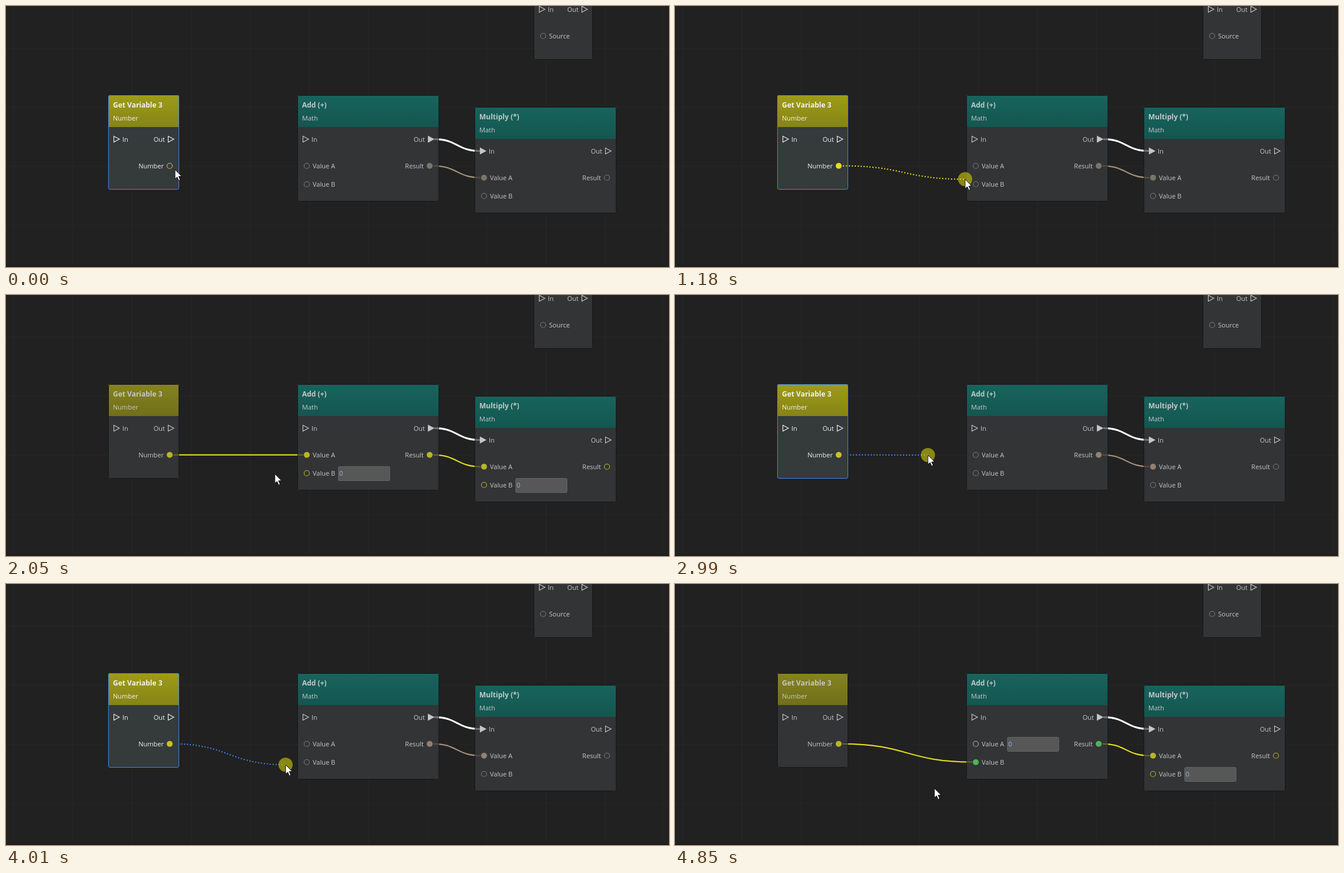
These frames come from a looping animation (1122 by 442 pixels, 5.18 s). An HTML page with a canvas:

```html
<!DOCTYPE html>
<html>
<head>
<meta charset="utf-8">
<style>
html, body { margin: 0; width: 1122px; height: 442px; overflow: hidden; background: #212121; }
canvas { display: block; }
</style>
</head>
<body>
<canvas id="stage" width="1122" height="442"></canvas>
<script>
const g = document.getElementById('stage').getContext('2d');
const LOOP = 5180, YELLOW = '#e2de1e', DULL = '#b8b528', BROWN = '#a59678', BLUE = '#4180ee', GREEN = '#50b258';

// Pointer path: time, x, y
const path = [
  [30, 286, 277], [260, 276, 267], [440, 275, 266], [620, 276, 266], [770, 363, 295],
  [900, 418, 299], [1130, 480, 297], [1200, 495, 292], [1540, 500, 277], [1740, 500, 276],
  [2050, 455, 303], [2380, 455, 303], [2890, 428, 271], [2990, 428, 271], [3520, 430, 269],
  [3650, 435, 269], [4010, 473, 306], [4060, 480, 307], [4180, 497, 304], [4340, 502, 302],
  [4620, 503, 302], [4850, 439, 346]
];

function pointerAt(t) {
  const i = path.findIndex(p => p[0] > t);
  if (i < 0) return path[path.length - 1].slice(1);
  if (i === 0) return path[0].slice(1);
  const [t0, x0, y0] = path[i - 1], [t1, x1, y1] = path[i];
  const k = (t - t0) / (t1 - t0);
  return [x0 + (x1 - x0) * k, y0 + (y1 - y0) * k];
}

function text(s, x, y, color, align = 'left', weight = '400 11px') {
  g.font = weight + ' "Open Sans", sans-serif';
  g.textAlign = align;
  g.fillStyle = color;
  g.fillText(s, x, y + 4);
}

function dot(x, y, color, full) {
  g.beginPath();
  g.arc(x, y, full ? 5 : 4.5, 0, 7);
  g.fillStyle = g.strokeStyle = color;
  g.lineWidth = 1.1;
  full ? g.fill() : g.stroke();
}

function arrow(x, y, color, full) {
  g.beginPath();
  g.moveTo(x, y - 5);
  g.lineTo(x + 9.5, y);
  g.lineTo(x, y + 5);
  g.closePath();
  g.fillStyle = g.strokeStyle = color;
  g.lineWidth = 1.1;
  if (full) g.fill();
  g.stroke();
}

function field(x, y) {
  g.beginPath();
  g.roundRect(x + .5, y - 11.5, 87, 24, 2);
  g.fillStyle = '#575757';
  g.fill();
  g.strokeStyle = '#636363';
  g.lineWidth = 1;
  g.stroke();
  text('0', x + 2, y, '#8fbbe2');
}

function box(x, y, w, h, hover, head) {
  g.save();
  g.beginPath();
  g.roundRect(x, y, w, h, 3);
  g.clip();
  g.fillStyle = hover ? '#353a3b' : '#333436';
  g.fillRect(x, y, w, h);
  if (head) {
    const fill = g.createLinearGradient(0, y, 0, y + 54);
    fill.addColorStop(0, head[0]);
    fill.addColorStop(1, head[1]);
    g.fillStyle = fill;
    g.fillRect(x, y, w, 54);
  }
  g.restore();
  g.beginPath();
  g.roundRect(x + .5, y + .5, w - 1, h - 1, 3);
  g.strokeStyle = hover ? '#4484ec' : '#171717';
  g.lineWidth = 1;
  g.stroke();
}

// flow: [in connected, out connected]; ports: [label, dy, isOutput, color, full, hasField]
function node(x, y, w, h, title, kind, hover, head, flow, ports) {
  const ink = hover ? '#f2f2f2' : '#c6c6c6';
  box(x, y, w, h, hover, head);
  if (title) {
    text(title, x + 8, y + 17, ink, 'left', '700 12px');
    text(kind, x + 8, y + 39, ink);
  }
  arrow(x + 9.5, y + 74.5, ink, flow[0]);
  text('In', x + 24, y + 75, ink);
  arrow(x + w - 18.5, y + 74.5, ink, flow[1]);
  text('Out', x + w - 24, y + 75, ink, 'right');
  for (const [label, dy, isOut, color, full, hasField] of ports) {
    const px = isOut ? x + w - 16 : x + 16;
    dot(px, y + dy - .3, color, full);
    text(label, isOut ? px - 10 : px + 10, y + dy, ink, isOut ? 'right' : 'left');
    if (hasField) field(x + 69, y + dy);
  }
}

function wire(x0, y0, x1, y1, color, width, dash = []) {
  const mid = (x0 + x1) / 2;
  g.beginPath();
  g.moveTo(x0, y0);
  g.bezierCurveTo(mid, y0, mid, y1, x1, y1);
  g.strokeStyle = color;
  g.lineWidth = width;
  g.setLineDash(dash);
  g.stroke();
  g.setLineDash([]);
}

function pointer(x, y) {
  g.beginPath();
  [[0, 0], [0, 16], [3.7, 12.7], [6.3, 18.7], [8.9, 17.5], [6.3, 11.7], [11.2, 11.5]]
    .forEach(([dx, dy]) => g.lineTo(x + dx, y + dy));
  g.closePath();
  g.fillStyle = '#fff';
  g.strokeStyle = '#111';
  g.lineWidth = 1;
  g.fill();
  g.stroke();
}

function grid() {
  g.fillStyle = '#212121';
  g.fillRect(0, 0, 1122, 442);
  g.fillStyle = '#272727';
  for (let x = 13; x < 1122; x += 100) g.fillRect(x, 0, 1, 442);
  for (let y = 71; y < 442; y += 100) g.fillRect(0, y, 1122, 1);
  g.fillStyle = '#1b1b1b';
  g.fillRect(0, 440, 1122, 2);
}

function draw(t) {
  const [mx, my] = pointerAt(t);
  const firstDrag = t >= 620 && t < 1740, secondDrag = t >= 2990 && t < 4620;
  const drag = firstDrag || secondDrag;
  const toA = t >= 1740 && t < 2990, toB = t >= 4620, linked = toA || toB;
  const overAdd = mx > 493, overVar = t < 1740 || secondDrag;
  const snap = drag && overAdd, snapB = snap && my > 286, snapA = snap && !snapB;
  const wireHot = t >= 2700 && t < 2990;

  const idle = '#797972', warm = overAdd ? '#aaa597' : idle;
  const joined = overAdd ? '#a8927c' : secondDrag ? '#957f6e' : '#7b746a';
  const result = toB ? GREEN : toA ? DULL : joined;
  const portA = toA ? DULL : toB ? '#b5ad98' : snapA ? '#a8927c' : warm;
  const portB = toB ? GREEN : toA ? DULL : snapB ? '#d0c83a' : warm;
  const mulA = linked ? DULL : secondDrag ? '#957f6e' : '#7b746a';
  const number = firstDrag ? YELLOW : secondDrag ? '#c8c324' : linked ? DULL : '#cbc821';

  const links = () => {
    wire(725, 225.5, 802, 245.5, '#fff', 3);
    wire(723, 270.7, 803, 290.7, linked ? YELLOW : secondDrag ? '#a89078' : BROWN, 2);
    if (toA) wire(283, 270.7, 503, 270.7, wireHot ? BLUE : YELLOW, wireHot ? 3 : 2);
    if (toB) wire(283, 270.7, 503, 301.5, YELLOW, 2);
  };
  const dragWire = () => {
    const ex = snap ? 506 : mx, ey = snapA ? 270.7 : snapB ? 301.5 : my;
    let color = secondDrag ? BLUE : YELLOW;
    if (firstDrag && snap) {
      color = g.createLinearGradient(283, 0, 506, 0);
      color.addColorStop(0, YELLOW);
      color.addColorStop(1, BROWN);
    }
    wire(secondDrag ? 281 : 284, 270.7, ex, ey, color, 2, [2, 3]);
  };
  const variableNode = () => node(173, 151, 120, 160, 'Get Variable 3', 'Number', overVar,
    overVar ? ['#9e9c18', '#868416'] : ['#858320', '#716f19'], [0, 0],
    [['Number', 120, 1, number, drag || linked]]);
  const addNode = () => node(493, 151, 240, 180, 'Add (+)', 'Math', overAdd,
    overAdd ? ['#0d7369', '#0b6058'] : ['#17645d', '#145650'], [0, 1], [
      ['Value A', 120, 0, portA, toA || snapA, toB],
      ['Value B', 151, 0, portB, toB || snapB, toA],
      ['Result', 120, 1, result, 1]
    ]);

  grid();
  links();
  if (secondDrag) dragWire();
  node(893, -69, 100, 160, '', '', false, null, [0, 0], [['Source', 120, 0, idle, 0]]);
  node(793, 171, 240, 180, 'Multiply (*)', 'Math', false, ['#17645d', '#145650'], [1, 0], [
    ['Value A', 120, 0, mulA, 1],
    ['Value B', 151, 0, linked ? DULL : idle, 0, linked],
    ['Result', 120, 1, linked ? DULL : idle, 0]
  ]);
  if (!overVar) variableNode();
  if (!overAdd) addNode();
  // Links stay faintly visible across idle nodes
  g.globalAlpha = .3;
  links();
  g.globalAlpha = 1;
  if (overVar) variableNode();
  if (overAdd) addNode();

  if (drag) {
    if (firstDrag) dragWire();
    g.beginPath();
    g.arc(mx, my, 12, 0, 7);
    g.fillStyle = 'rgba(208,204,8,.6)';
    g.fill();
  }
  pointer(mx, my);
}

function tick() {
  draw(performance.now() % LOOP);
  requestAnimationFrame(tick);
}
tick();
</script>
</body>
</html>
```
